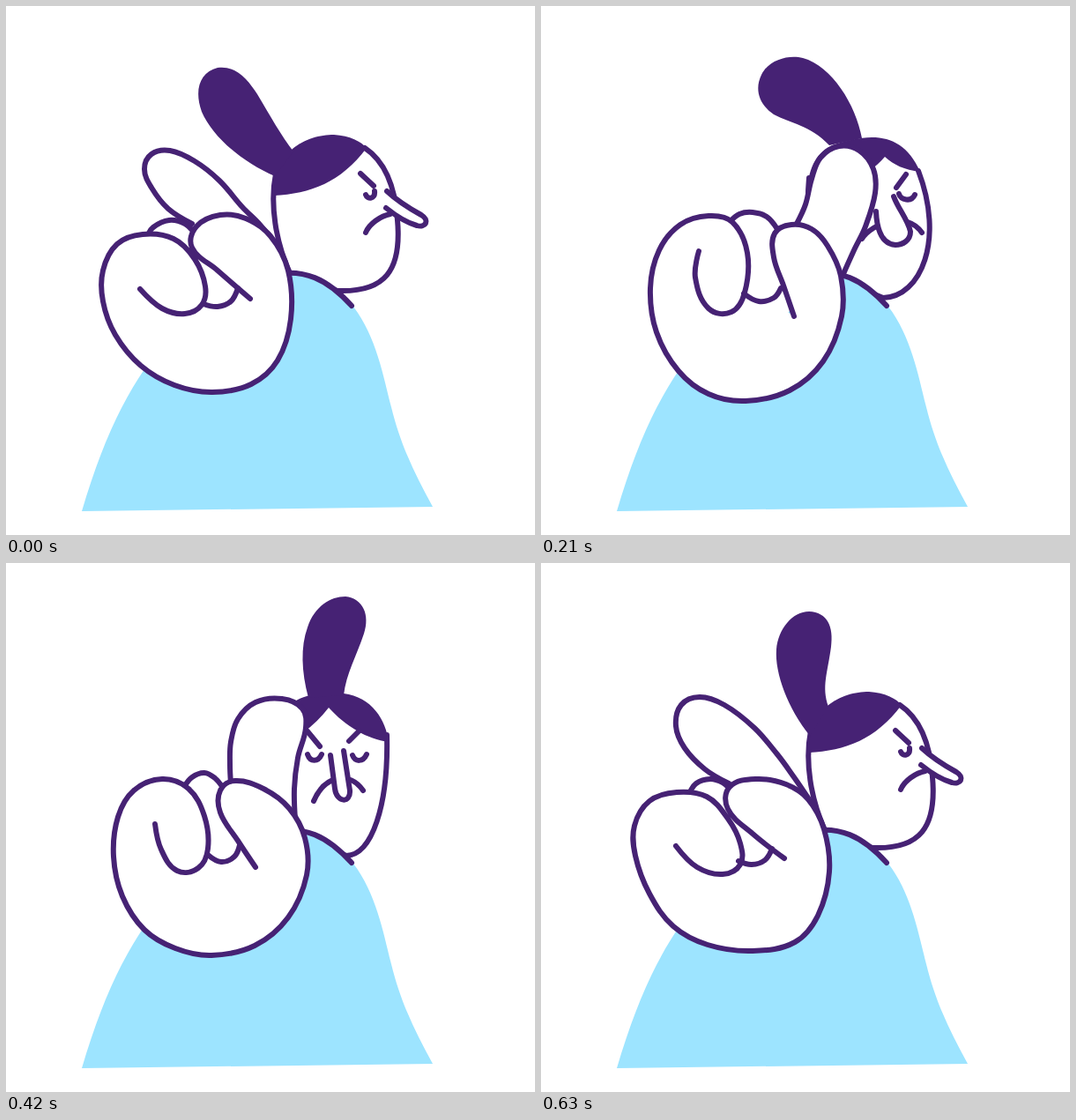
Animation, 600 px wide and 600 px high, one loop 0.7 s. Source, as an HTML page:

```html
<!DOCTYPE html>
<html lang="en">
<head>
<meta charset="utf-8">
<title>Wagging finger</title>
<style>
  html, body { margin: 0; width: 100%; height: 100%; overflow: hidden; background: #fff; }
  svg { display: block; width: 100%; height: 100%; }
  path { fill: none; stroke: #462274; stroke-width: 6; stroke-linecap: round; stroke-linejoin: round; }
  .skin { fill: #fff; }
  .hair { fill: #462274; stroke: none; }
  .shirt { fill: #9de4ff; stroke: none; }
</style>
</head>
<body>
<svg viewBox="0 0 600 600">
  <path id="face" class="skin"/>
  <path id="hair" class="hair"/>
  <path id="pony" class="hair"/>
  <path id="marks"/>
  <path id="nose" class="skin"/>
  <path class="shirt" d="M86 573C107 501 131 450 157 412C225 405 275 360 318 304C352 299 375 318 394 341C420 375 428 420 437 455C448 500 465 533 484 568Z"/>
  <path d="M306 304C338 299 363 308 392 340"/>
  <path id="finger" class="skin"/>
  <path id="knuckle" class="skin"/>
  <path id="fist" class="skin"/>
  <path id="tip"/>
</svg>
<script>
const STEP = 70;

// Heads: marks are brows, eyes and mouth.
const side = {
  face: 'M306 190C299 225 306 268 322 303L376 323C430 325 449 300 444 243C441 200 428 175 407 161',
  hair: 'M304 215C302 165 340 146 372 146C390 147 403 154 409 161C380 200 345 213 304 215Z',
  marks: 'M402 190L417 204M408 214C410 220 419 219 418 210M436 236C425 238 412 247 408 257',
  nose: 'M432 210C445 222 460 231 471 237C481 243 476 252 466 249C455 246 441 237 431 229'
};
const front = {
  face: 'M304 195C300 240 306 275 320 303L386 332C415 331 434 275 432 195',
  hair: 'M302 214C300 172 325 154 345 150L383 148C415 152 431 178 434 203C410 200 385 185 366 164C350 185 325 203 302 214Z',
  marks: 'M342 191L356 208M401 190L389 202M342 217C345 226 354 226 358 217M393 218C396 226 405 226 409 217M349 270C362 240 390 236 405 258',
  nose: 'M368 218L373 256C375 272 391 273 390 258L383 213'
};
const turnAway = {
  face: 'M304 195C300 240 306 275 320 303L388 331C431 330 458 265 428 187',
  hair: 'M302 212C303 180 315 165 330 158C375 143 410 143 430 188C412 186 400 180 390 171C370 195 340 205 302 212Z',
  marks: 'M414 191L403 206M406 213C408 220 420 223 424 214M364 264C376 246 415 232 432 257',
  nose: 'M400 216C405 230 416 242 419 256C419 266 410 271 402 271C387 270 381 255 380 233'
};
const turnBack = {
  face: 'M317 200C304 230 303 255 306 275L380 327C415 328 430 310 433 270C440 240 440 215 437 195',
  hair: 'M313 207C317 190 322 178 330 170L356 152C378 149 400 153 418 163C435 175 442 192 441 212C428 197 420 190 409 183C385 198 350 208 313 207Z',
  marks: 'M363 201L381 210M426 213L436 206M348 216C350 228 372 229 384 217M343 264C352 256 368 248 386 247',
  nose: 'M387 217C386 245 390 262 398 271C405 279 420 278 435 275C455 272 460 258 450 243C443 234 435 228 427 220'
};

const pony = {
  left: 'M305 193C270 178 235 150 222 120C213 95 220 75 240 70C262 67 275 85 285 100C300 125 312 147 326 165',
  drag: 'M327 158C305 135 283 133 264 123C245 110 243 92 250 78C259 60 282 55 297 59C330 68 357 112 364 150',
  right: 'M342 153C337 120 340 85 355 60C368 42 385 40 398 41C420 44 428 65 418 85C405 108 388 125 383 150',
  up: 'M343 153C333 125 327 105 329 85C332 55 350 35 372 35C390 36 398 52 394 75C388 105 384 125 383 150',
  back: 'M328 172C305 148 282 125 274 103C265 75 282 43 310 43C333 43 344 62 345 85C346 110 349 130 358 152',
  swing: 'M305 196C280 165 265 125 267 98C269 75 285 55 304 55C325 56 332 72 329 95C325 125 318 140 326 163'
};

// Hands: points along each line, in the same order in every pose.
const rest = {
  finger: '211,247 184,230 165,206 157,185 165,168 186,164 214,176 242,198 268,228 288,248 304,268',
  knuckle: '160,262 167,251 185,243 203,247 214,258',
  fist: '152,321 177,343 203,349 222,339 226,318 214,287 190,264 155,259 126,270 110,300 110,335 124,373 153,408 191,430 234,438 278,429 308,402 323,355 320,300 300,261 272,241 243,237 216,250 211,274 240,300 277,332',
  tip: '224,338 240,341 255,335 263,320'
};
const bent = {
  finger: '268,236 266,207 253,184 238,164 238,145 262,135 294,143 323,161 333,185 330,228 322,274',
  knuckle: '190,252 203,237 220,232 240,237 252,252',
  fist: '165,294 171,319 190,339 217,337 225,318 213,280 194,253 166,245 137,256 122,287 123,325 134,370 153,406 190,434 232,441 277,429 307,395 329,345 329,293 313,258 293,241 272,236 256,249 255,275 269,310 276,349',
  tip: '222,328 243,335 262,329 270,315'
};
const push = {
  finger: '290,247 300,225 307,196 317,172 338,159 361,164 377,185 379,212 368,250 355,277 342,306',
  knuckle: '214,245 225,236 240,234 256,239 268,253',
  fist: '179,278 175,308 190,343 216,347 231,325 234,280 217,245 190,238 158,248 134,277 124,320 131,370 156,414 190,440 232,448 282,436 320,403 341,352 340,306 325,272 307,253 284,248 265,258 264,285 275,317 287,352',
  tip: '230,326 247,335 264,331 272,320'
};
const reach = {
  finger: '290,251 303,233 321,208 340,188 361,176 385,177 400,191 399,214 385,246 366,277 347,309',
  knuckle: '222,245 233,238 247,236 260,243 270,255',
  fist: '186,280 179,310 188,343 214,349 235,328 241,285 226,246 196,234 160,247 137,280 127,335 135,382 158,419 190,440 229,448 275,437 318,403 345,355 349,320 336,287 313,262 285,251 265,264 262,292 276,325 286,354',
  tip: '236,332 251,342 266,336 272,322'
};
const pull = {
  finger: '219,248 204,225 188,198 186,165 205,140 240,131 271,138 280,159 276,195 288,234 308,272',
  knuckle: '181,262 188,247 202,240 214,244 222,254',
  fist: '152,311 172,340 199,355 221,343 222,320 208,288 187,265 157,256 129,268 117,295 117,330 129,374 156,412 193,434 237,442 288,430 321,400 336,352 329,303 306,268 270,249 234,242 221,252 224,274 250,304 279,335',
  tip: '222,330 237,335 252,329 258,317'
};
const settle = {
  finger: '213,248 199,227 183,204 176,180 183,154 204,139 227,142 240,160 253,192 277,233 304,270',
  knuckle: '176,264 183,252 199,248 210,250 216,256',
  fist: '151,318 176,345 204,354 225,343 224,316 211,288 187,266 155,260 124,269 110,300 110,335 125,375 155,410 195,434 240,442 288,431 319,400 331,350 325,302 303,270 273,251 237,245 211,256 211,280 238,305 276,335',
  tip: '224,336 236,342 249,335 256,322'
};
const over = {
  finger: '213,250 186,234 163,210 153,185 159,161 180,152 208,161 242,187 268,217 287,243 304,268',
  knuckle: '168,262 176,250 192,245 206,249 214,256',
  fist: '153,321 177,345 206,353 226,342 226,318 212,290 188,265 154,260 123,270 106,298 107,332 123,375 150,412 189,433 240,440 288,430 314,400 327,350 321,302 303,268 278,251 244,245 214,254 212,279 240,307 276,335',
  tip: '224,338 239,342 254,337 262,324'
};

// Blend two strings that differ only in their numbers.
function mix(a, b, t) {
  const to = b.match(/\d+/g);
  let i = 0;
  return a.replace(/\d+/g, n => Math.round(+n + (to[i++] - n) * t));
}

function mixHand(a, b, t) {
  return Object.fromEntries(Object.keys(a).map(k => [k, mix(a[k], b[k], t)]));
}

// Smooth line through points; handles scale with the length of each piece.
function curve(text) {
  const pts = text.split(' ').map(p => p.split(',').map(Number));
  const last = pts.length - 1;
  const dirs = pts.map((p, i) => {
    if (i === 0 || i === last) return [0, 0];
    const dx = pts[i + 1][0] - pts[i - 1][0];
    const dy = pts[i + 1][1] - pts[i - 1][1];
    const len = Math.hypot(dx, dy);
    return [dx / len, dy / len];
  });
  let d = 'M' + pts[0];
  for (let i = 0; i < last; i++) {
    const [x, y] = pts[i], [u, v] = pts[i + 1];
    const h = Math.hypot(u - x, v - y) * 0.36;
    const [ax, ay] = dirs[i], [bx, by] = dirs[i + 1];
    d += 'C' + [x + ax * h, y + ay * h, u - bx * h, v - by * h, u, v].map(n => n.toFixed(1));
  }
  return d;
}

function pose(head, tail, hand) {
  const drawn = { ...head, pony: tail };
  for (const part in hand) drawn[part] = curve(hand[part]);
  return drawn;
}

const poses = [
  pose(side, pony.left, rest),
  pose(side, pony.left, mixHand(rest, bent, 0.5)),
  pose(side, pony.left, bent),
  pose(turnAway, pony.drag, push),
  pose(front, mix(pony.drag, pony.right, 0.6), mixHand(push, reach, 0.5)),
  pose(front, pony.right, reach),
  pose(front, mix(pony.right, pony.up, 0.5), mixHand(reach, pull, 0.5)),
  pose(front, pony.up, pull),
  pose(turnBack, pony.back, settle),
  pose(side, pony.swing, over)
];

let shown = -1;
function show(step) {
  if (step === shown) return;
  shown = step;
  for (const part in poses[step]) {
    document.getElementById(part).setAttribute('d', poses[step][part]);
  }
}

const start = performance.now();
function tick(now) {
  show(Math.floor(Math.max(0, now - start) / STEP) % poses.length);
  requestAnimationFrame(tick);
}
show(0);
requestAnimationFrame(tick);
</script>
</body>
</html>
```
